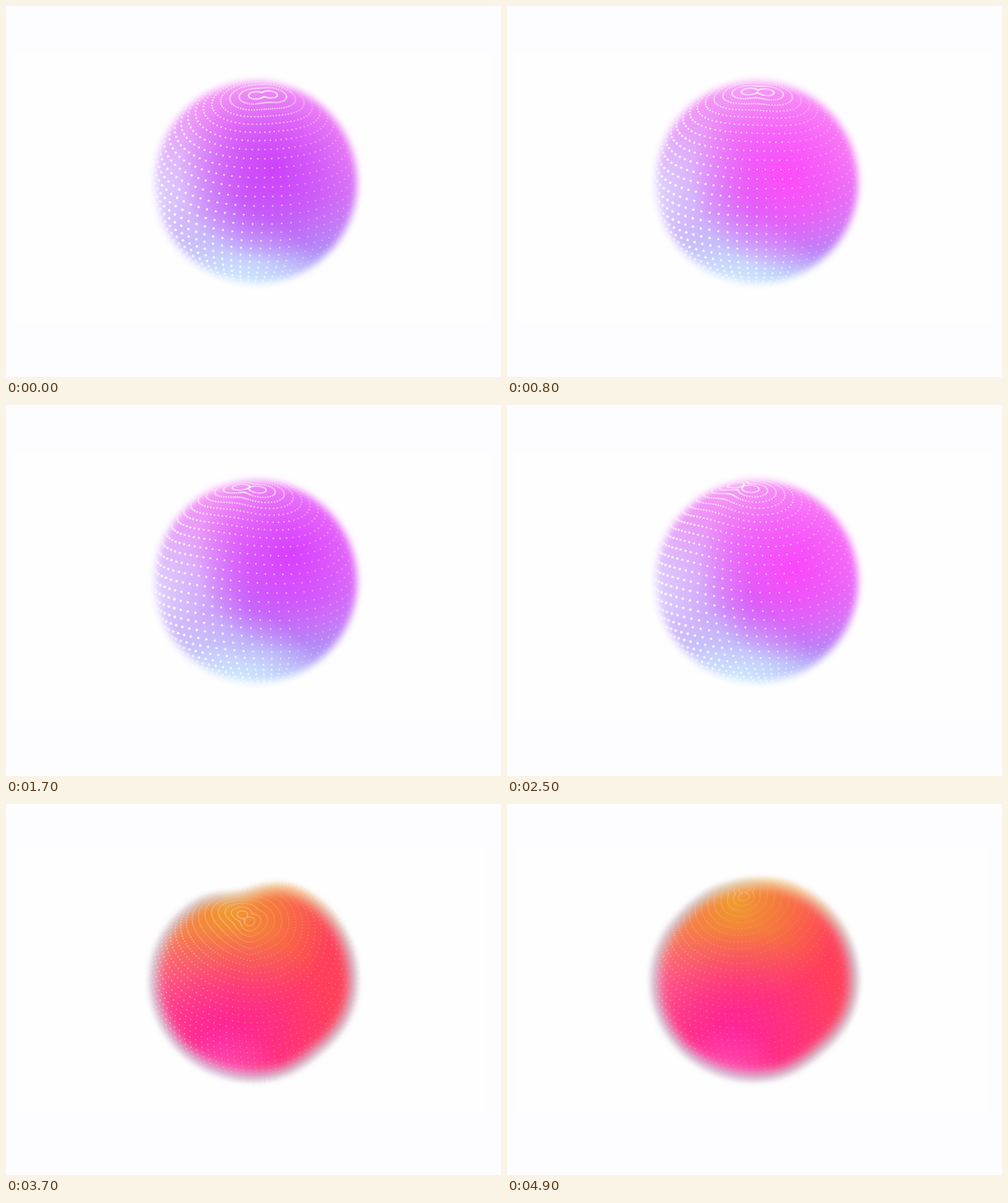
Animation, 600 px wide and 450 px high, one loop 5 s. Source, as an HTML page with a canvas:

```html
<!DOCTYPE html>
<html>
<head>
<meta charset="utf-8">
<style>
html, body { margin: 0; width: 100%; height: 100%; overflow: hidden; background: #fdfcff; }
canvas { display: block; }
</style>
</head>
<body>
<canvas id="stage" width="600" height="450"></canvas>
<script>
const W = 600, H = 450, CY = 214, TAU = Math.PI * 2;
const ctx = document.getElementById('stage').getContext('2d');
const layer = document.createElement('canvas');
layer.width = W;
layer.height = H;
const lc = layer.getContext('2d');

const clamp = (v, lo = 0, hi = 1) => Math.min(hi, Math.max(lo, v));

// Bell curve around an angle
function bump(a, center, width) {
  const d = (((a + TAU) % TAU) - center) / width;
  return Math.exp(-d * d);
}

// Linear interpolation through rows of [time, values...]
function track(rows, t) {
  let i = 0;
  while (i < rows.length - 2 && t > rows[i + 1][0]) i++;
  const a = rows[i], b = rows[i + 1];
  const k = clamp((t - a[0]) / (b[0] - a[0]));
  return a.slice(1).map((v, j) => v + (b[j + 1] - v) * k);
}

// Sphere glow: x, y, r, g, b, strength of the pink right side
const CORE = [
  [0, 325, 198, 204, 66, 250, .45],
  [.8, 338, 208, 255, 74, 250, .7],
  [1.7, 345, 182, 216, 62, 255, .4],
  [2.5, 347, 198, 250, 70, 250, .6],
  [3.2, 350, 200, 252, 70, 250, .6]
];

// Blob: dent depth, orange x, orange y, pink x, pink y, pole tilt
const BLOB = [
  [3.1, 22, 262, 130, 255, 295, .75],
  [4.3, 11, 275, 128, 268, 282, .9],
  [4.9, 3, 275, 118, 272, 288, .55]
];

function glow(c, x, y, r, rgb, alpha = 1) {
  const g = c.createRadialGradient(x, y, 0, x, y, r);
  g.addColorStop(0, `rgba(${rgb},${alpha})`);
  g.addColorStop(.5, `rgba(${rgb},${alpha * .55})`);
  g.addColorStop(1, `rgba(${rgb},0)`);
  c.fillStyle = g;
  c.fillRect(0, 0, W, H);
}

function fillShape(c, cx, radius, inset, blur, style) {
  c.save();
  c.filter = `blur(${blur}px)`;
  c.fillStyle = style;
  c.beginPath();
  for (let i = 0; i < 180; i++) {
    const a = i / 180 * TAU, r = radius(a) - inset;
    c.lineTo(cx + r * Math.cos(a), CY + r * Math.sin(a));
  }
  c.fill();
  c.restore();
}

// Keeps only the soft-edged shape of the current layer
function cutLayer(cx, radius, inset, blur) {
  lc.globalCompositeOperation = 'destination-in';
  fillShape(lc, cx, radius, inset, blur, '#000');
  lc.globalCompositeOperation = 'source-over';
}

function dots(cx, radius, o) {
  const ct = Math.cos(o.tilt), st = Math.sin(o.tilt);
  const cr = Math.cos(o.roll), sr = Math.sin(o.roll);
  for (let i = 1; i < o.rows; i++) {
    for (let j = 0; j < o.cols; j++) {
      const lon = j / o.cols * TAU + o.spin;
      const lat = (i / o.rows - .5) * Math.PI + o.warp * Math.sin(2 * lon + o.phase);
      const px = Math.cos(lat) * Math.sin(lon);
      const pz = Math.cos(lat) * Math.cos(lon);
      const py = Math.sin(lat);
      const z = pz * ct + py * st;
      if (z < .05) continue;
      const down = pz * st - py * ct;
      const x = px * cr - down * sr, y = px * sr + down * cr;
      const r = radius(Math.atan2(y, x)) - 2;
      const [size, color, alpha] = o.look(x, y);
      ctx.fillStyle = `rgba(${color},${alpha * clamp(z * 2.2)})`;
      ctx.beginPath();
      ctx.arc(cx + x * r, CY + y * r, size, 0, TAU);
      ctx.fill();
    }
  }
}

function drawSphere(t) {
  const cx = 303, radius = () => 127.5;
  const [x, y, r, g, b, side] = track(CORE, t);
  const base = lc.createLinearGradient(0, 87, 0, 342);
  base.addColorStop(0, '#f9a2f6');
  base.addColorStop(.25, '#ec82f8');
  base.addColorStop(.55, '#c573f8');
  base.addColorStop(.8, '#b38cf6');
  base.addColorStop(1, '#b9ccfa');
  lc.fillStyle = base;
  lc.fillRect(0, 0, W, H);
  glow(lc, 436, 175, 130, '255,150,238', side);
  glow(lc, 165, 230, 135, '228,226,255', .95);
  glow(lc, 275, 356, 110, '212,240,255', 1);
  glow(lc, x, y, 115, [r, g, b].map(Math.round));
  cutLayer(cx, radius, 5, 4);
  ctx.drawImage(layer, 0, 0);
  dots(cx, radius, {
    rows: 34, cols: 66, tilt: .55 - .07 * t, roll: .08 - .09 * t,
    spin: .12 * t, warp: .05 + .02 * t, phase: 1 + .9 * t,
    look: (x, y) => [
      .95 + .85 * clamp((y * .5 - x) * .9),
      x > .35 ? '255,205,255' : '255,255,255',
      clamp(.72 - .25 * x, .45, .9)
    ]
  });
}

function drawBlob(t, alpha) {
  const cx = 300;
  const [dent, ox, oy, px, py, tilt] = track(BLOB, t);
  const radius = a => 131 - 4 * Math.max(0, Math.sin(a)) ** 2
    - 4 * bump(a, .83, .35) - dent * bump(a, 4.56, .36) - 4 * bump(a, 3.95, .4);

  ctx.globalAlpha = alpha;
  const rim = ctx.createRadialGradient(350, 85, 25, 350, 85, 120);
  rim.addColorStop(0, '#f3dfb0');
  rim.addColorStop(1, '#cfd3df');
  fillShape(ctx, cx, radius, 5, 3.5, rim);

  lc.fillStyle = '#ff3f5c';
  lc.fillRect(0, 0, W, H);
  glow(lc, 170, 205, 110, '255,125,150', .8);
  glow(lc, ox, oy, 130, '240,155,45');
  glow(lc, px, py, 140, '255,35,158');
  glow(lc, 265, 345, 75, '255,105,195', .7);
  cutLayer(cx, radius, 14, 7);
  ctx.drawImage(layer, 0, 0);

  const fade = 1 - .4 * clamp((t - 4.3) / .6);
  dots(cx, radius, {
    rows: 44, cols: 96, tilt, roll: -.12, spin: .12 * t, warp: .06, phase: t,
    look: x => {
      const left = clamp(.1 - x);
      return [.7 + .2 * left, `255,${175 + 60 * left | 0},${115 + 125 * left | 0}`, .6 * fade];
    }
  });
  ctx.globalAlpha = 1;
}

function draw(t) {
  const mix = clamp((t - 3) / .33);
  ctx.fillStyle = '#fdfcff';
  ctx.fillRect(0, 0, W, H);
  ctx.fillStyle = '#fefefe';
  if (mix < 1) {
    ctx.fillRect(8, 57, 580, 327);
    drawSphere(t);
  } else {
    ctx.fillRect(13, 52, 568, 322);
  }
  if (mix > 0) drawBlob(t, mix);
}

let last = -1;
const start = performance.now();
function tick() {
  const step = Math.floor((performance.now() - start) % 5000 / 100);
  if (step !== last) draw((last = step) / 10);
  requestAnimationFrame(tick);
}
tick();
</script>
</body>
</html>
```
